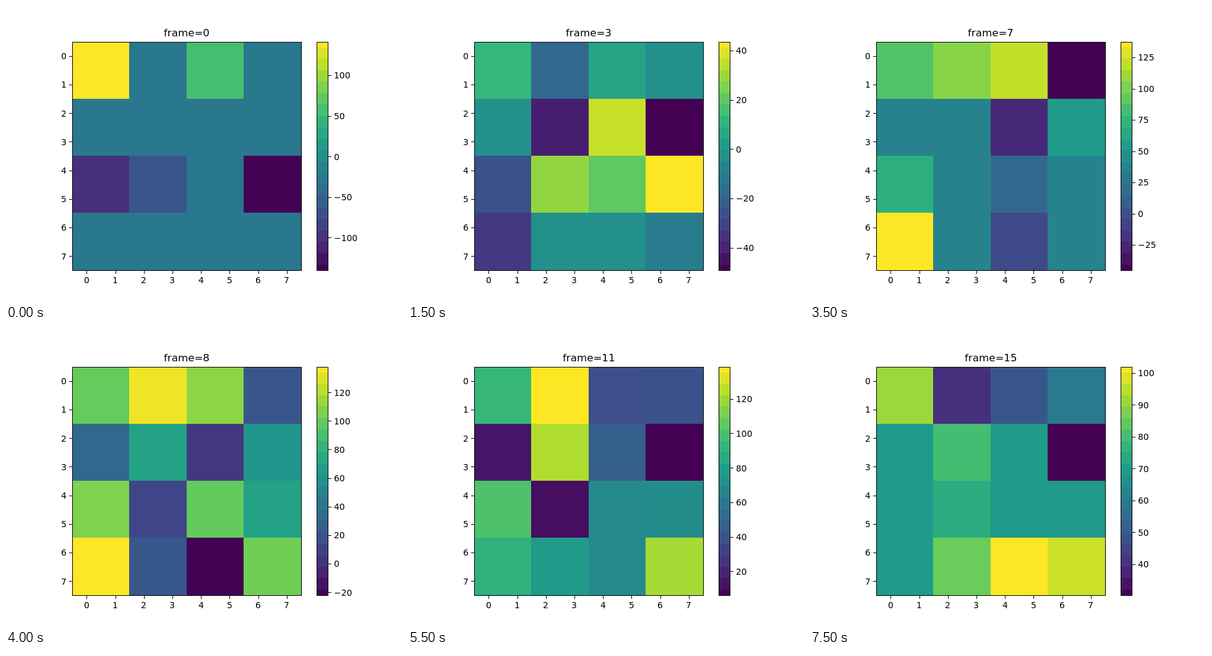
An HTML page with a canvas for the animation above (8000 ms loop, 640x480 px).

```html
<!DOCTYPE html>
<html lang="en">
<head>
<meta charset="utf-8">
<title>Heatmap</title>
<style>
html, body { margin: 0; width: 100%; height: 100%; overflow: hidden; background: #fff; }
canvas { display: block; }
</style>
</head>
<body>
<canvas id="stage" width="640" height="480"></canvas>
<script>
const ctx = document.getElementById('stage').getContext('2d');
const STEP = 500, COUNT = 16;
const LEFT = 107.2, TOP = 57.6, SIZE = 369.6, BOTTOM = TOP + SIZE;
const BAR_X = 502, BAR_W = 18, BANDS = 20;

const palette = ['440154', '482878', '3e4989', '31688e', '26828e',
  '1f9e89', '35b779', '6ece58', 'b5de2b', 'fde725']
  .map(h => [0, 2, 4].map(i => parseInt(h.slice(i, i + 2), 16)));

// Hot cells step down from the top of the scale, cold cells step up
// from the bottom, and all others rest at the middle level.
const keys = [
  { at: 0, lo: -140.5, hi: 141.5, mid: 0.4, hot: [0, 2], cold: [11, 8, 9] },
  { at: 3, lo: -49.2, hi: 43.6, mid: 0.5, hot: [11, 6, 9, 10, 0, 2], cold: [7, 5, 12, 8, 1, 15] },
  { at: 5, lo: -93, hi: 60.5, mid: 0.57, hot: [8, 0, 4, 9, 10, 13], cold: [11, 2, 7, 1] },
  { at: 7, lo: -45.4, hi: 137.6, mid: 0.45, hot: [12, 2, 1, 0, 8, 7], cold: [3, 6, 14, 10] },
  { at: 9, lo: 1, hi: 138.4, mid: 0.62, hot: [10, 15, 1, 8, 12], cold: [14, 9, 13, 4, 6, 7, 2] },
  { at: 13, lo: 11, hi: 139, mid: 0.47, hot: [14, 13, 5, 1, 0], cold: [10, 7, 3, 2, 4, 11] },
  { at: 15, lo: 30.2, hi: 102, mid: 0.54, hot: [14, 15, 0, 13, 5, 9], cold: [7, 1, 2, 3] }
];

const mix = (a, b, t) => a + (b - a) * t;
const clamp = v => Math.max(0, Math.min(1, v));

function viridis(t) {
  const p = clamp(t) * 9, i = Math.min(8, Math.floor(p));
  return `rgb(${palette[i].map((c, k) => Math.round(mix(c, palette[i + 1][k], p - i)))})`;
}

function level({ mid, hot, cold }, cell) {
  const h = hot.indexOf(cell), c = cold.indexOf(cell);
  if (h >= 0) return mix(1, mid, h / hot.length);
  if (c >= 0) return mix(0, mid, c / cold.length);
  return mid;
}

function stateAt(n) {
  const j = Math.max(1, keys.findIndex(k => k.at >= n));
  const a = keys[j - 1], b = keys[j], w = (n - a.at) / (b.at - a.at);
  const raw = Array.from({ length: 16 }, (_, i) => mix(level(a, i), level(b, i), w));
  const min = Math.min(...raw), max = Math.max(...raw);
  return {
    cells: raw.map(v => (v - min) / (max - min)),
    lo: mix(a.lo, b.lo, w),
    hi: mix(a.hi, b.hi, w)
  };
}

function box(color, x, y, w, h) {
  ctx.fillStyle = color;
  ctx.fillRect(x, y, w, h);
}

function text(str, x, y, align, size = 13.889) {
  ctx.font = `${size}px "DejaVu Sans", sans-serif`;
  ctx.fillStyle = '#000';
  const shift = { left: 0, center: 0.5, right: 1 }[align];
  ctx.fillText(str, Math.round(x - ctx.measureText(str).width * shift), Math.round(y));
}

function border(x, w) {
  ctx.strokeStyle = '#000';
  ctx.lineWidth = 1;
  ctx.strokeRect(x + 0.5, 58.5, w, 369);
}

function drawGrid(cells) {
  const size = SIZE / 4;
  cells.forEach((v, i) => {
    const x = LEFT + (i % 4) * size, y = TOP + Math.floor(i / 4) * size;
    const x0 = Math.floor(x), y0 = Math.max(58, Math.floor(y));
    box(viridis(v), x0, y0, Math.ceil(x + size) - x0, Math.ceil(y + size) - y0);
  });
  border(107, 370);
  for (let i = 0; i < 8; i++) {
    const d = (i + 0.5) * SIZE / 8;
    box('#000', Math.round(LEFT + d), 428, 1, 5);
    box('#000', 102, Math.round(TOP + d), 5, 1);
    text(i, LEFT + d, 448, 'center');
    text(i, 97.5, TOP + d + 5.45, 'right');
  }
}

function drawBar(lo, hi) {
  const span = hi - lo;
  for (let i = 0; i <= BANDS; i++) {
    const y0 = Math.round(BOTTOM - clamp((i + 0.5) / BANDS) * SIZE);
    const y1 = Math.round(BOTTOM - clamp((i - 0.5) / BANDS) * SIZE);
    box(viridis(i / BANDS), BAR_X, y0, BAR_W, y1 - y0);
  }
  border(BAR_X, BAR_W);
  const step = [10, 20, 25, 50].find(s => span / s <= 9);
  for (let v = Math.ceil(lo / step) * step; v <= hi; v += step) {
    const y = BOTTOM - (v - lo) / span * SIZE;
    box('#000', 521, Math.round(y), 5, 1);
    text((v < 0 ? '\u2212' : '') + Math.abs(v), 530.3, y + 5.45, 'left');
  }
}

function draw(n) {
  const { cells, lo, hi } = stateAt(n);
  box('#fff', 0, 0, 640, 480);
  text('frame=' + n, 292, 49, 'center', 16.667);
  drawGrid(cells);
  drawBar(lo, hi);
}

const start = performance.now();
function tick() {
  const t = Math.max(0, performance.now() - start);
  draw(Math.floor(t / STEP) % COUNT);
  requestAnimationFrame(tick);
}
tick();
</script>
</body>
</html>
```
